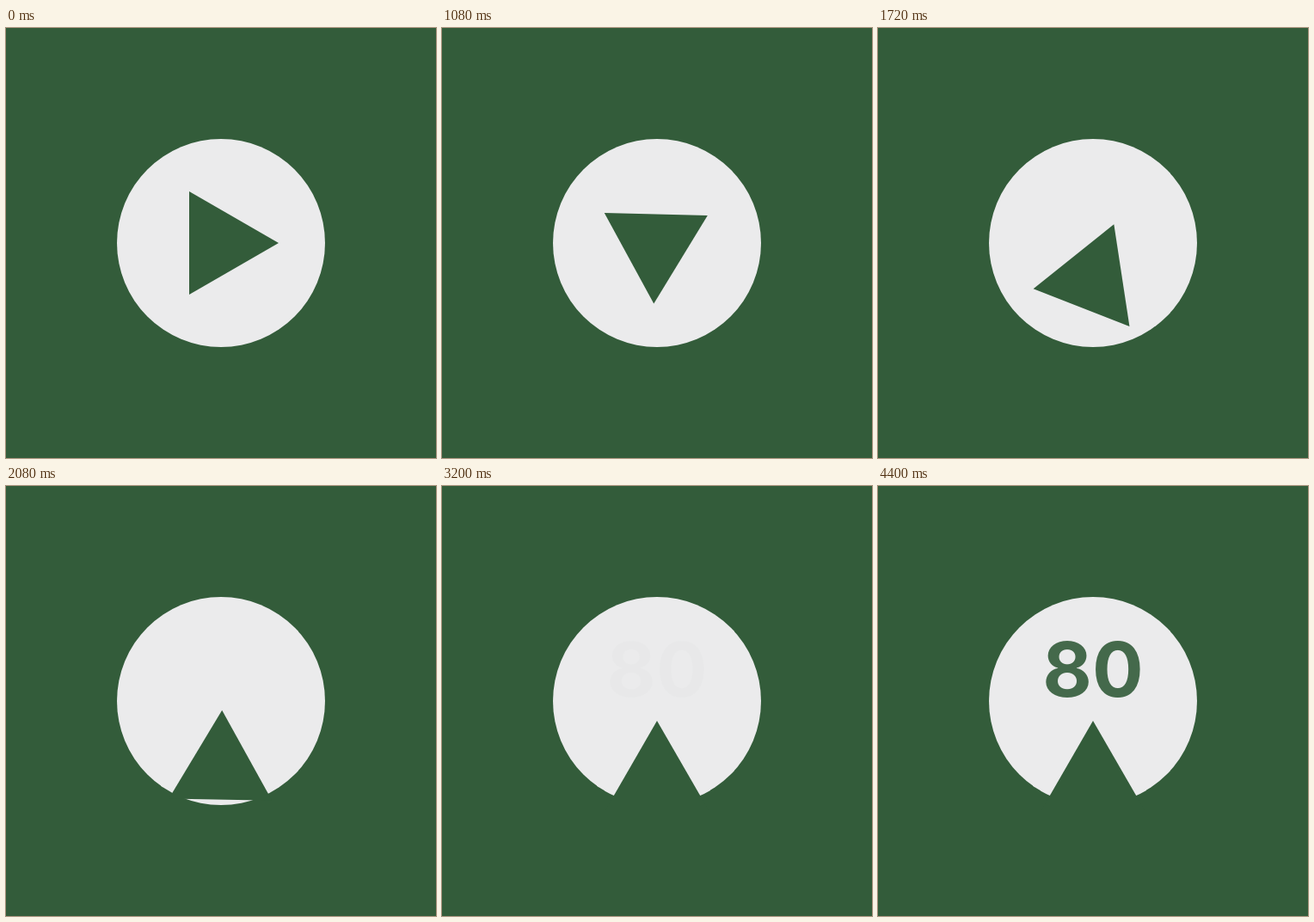
An HTML page that plays this animation: 500x500 px, repeating every 4440 ms.

```html
<!DOCTYPE html>
<html lang="en">
<head>
<meta charset="utf-8">
<style>
  html, body { margin: 0; width: 100%; height: 100%; overflow: hidden; background: #335c3a; }
  svg { display: block; width: 100vw; height: 100vh; }
  text { font: 700 88.5px Inter, sans-serif; text-anchor: middle; }
</style>
</head>
<body>
<svg viewBox="0 0 500 500" fill="#335c3a">
  <circle cx="250" cy="250" r="121" fill="#ebebec"/>
  <path id="play" d="M-37-60V60L67 0Z"/>
  <text id="label" x="250" y="245" opacity="0">80</text>
</svg>
<script>
const LOOP = 4440;
const play = document.getElementById('play');
const label = document.getElementById('label');

// Bezier easing from start to end; a and b are the x handles, with flat ends.
function ease(time, start, end, a = 1 / 3, b = 2 / 3) {
  const x = Math.min(1, Math.max(0, (time - start) / (end - start)));
  let low = 0, high = 1;
  for (let i = 0; i < 24; i++) {
    const u = (low + high) / 2, v = 1 - u;
    if (3 * a * u * v * v + 3 * b * u * u * v + u ** 3 < x) low = u;
    else high = u;
  }
  return low * low * (3 - 2 * low);
}

function draw(time) {
  const turn = -90 * ease(time, 200, 2136, 0.39, 0.87);
  const y = 250 + 90 * ease(time, 1160, 2360);
  play.setAttribute('transform', `translate(250 ${y}) rotate(${turn})`);
  label.setAttribute('opacity', 0.9 * ease(time, 3160, 3760));
}

const begin = performance.now();
function tick() {
  draw((performance.now() - begin) % LOOP);
  requestAnimationFrame(tick);
}
tick();
</script>
</body>
</html>
```
